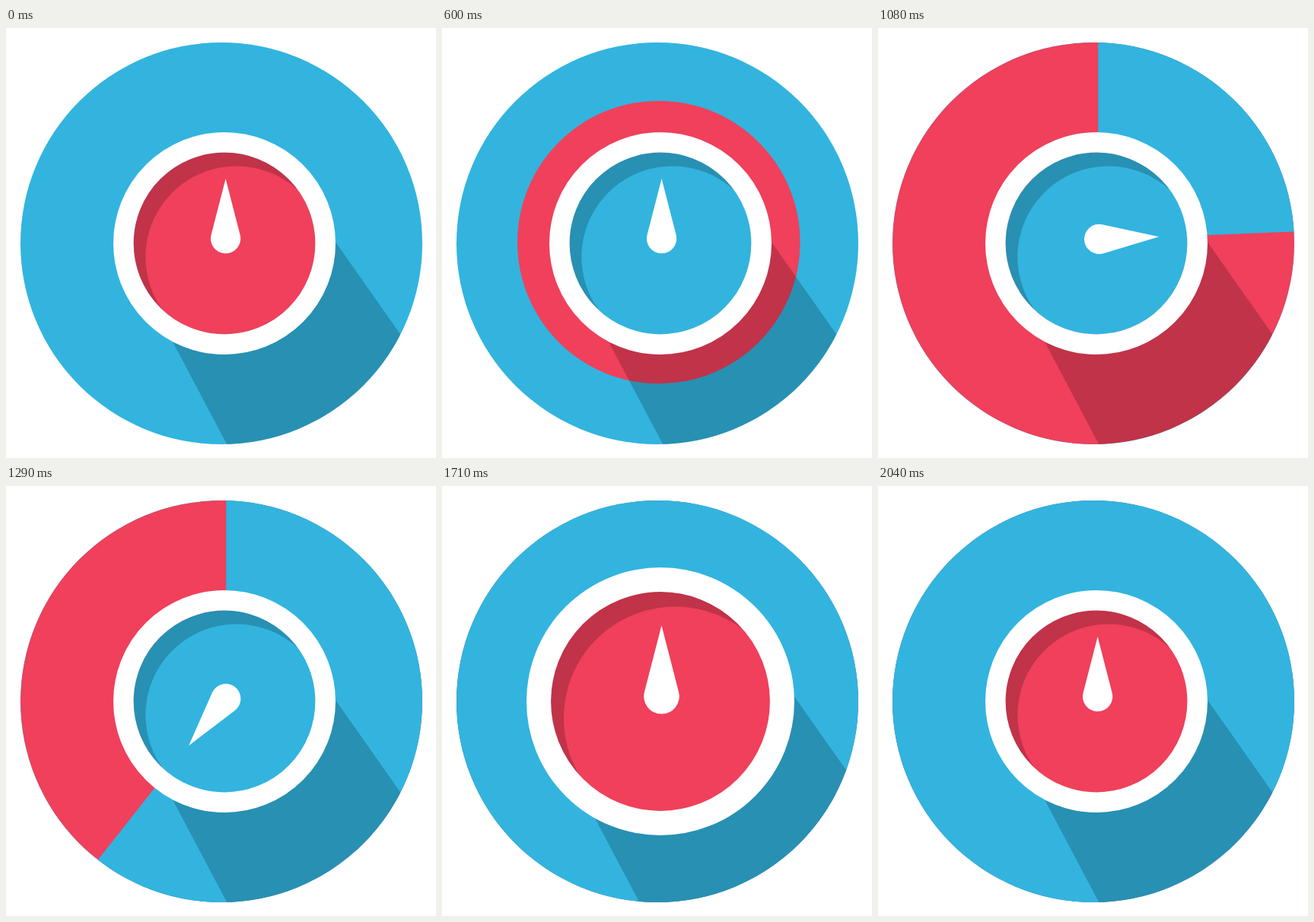
These frames come from a looping animation (565x565 px, 4.04 s). An HTML page:

```html
<!DOCTYPE html>
<html lang="en">
<head>
<meta charset="utf-8">
<title>Dial</title>
<style>
  html, body { margin: 0; width: 100%; height: 100%; overflow: hidden; background: #fff; }
  svg { display: block; width: 100%; height: 100%; }
</style>
</head>
<body>
<svg viewBox="0 0 565 565">
  <defs>
    <clipPath id="face"><circle cx="283" cy="283" r="264"/></clipPath>
  </defs>
  <circle cx="283" cy="283" r="264" fill="#32b4df"/>
  <g clip-path="url(#face)">
    <circle id="flood" fill="#f0405b"/>
    <path id="sweep" fill="#32b4df"/>
    <path id="shadow" opacity=".2"
      d="M129 -26L486 482L219 672L-83 101A131 131 0 0 0 129 -26Z"/>
  </g>
  <circle id="base" cx="287" cy="283" r="119.6"/>
  <circle id="fill"/>
  <path id="crescent" opacity=".2"
    d="M96.75 -70.05A119.5 119.5 0 1 0 -81.25 87.55A119.5 119.5 0 0 1 96.75 -70.05Z"/>
  <circle id="ring" r="132.7" fill="none" stroke="#fff" stroke-width="26.6"/>
  <path id="needle" fill="#fff" d="M-.6 -80L18.4 -6.2A19.6 19.6 0 1 1 -19.6 -6.2Z"/>
</svg>
<script>
const LOOP = 4040, STEP = 30;
const BLUE = '#32b4df', RED = '#f0405b';
const PIVOT = { x: 289.2, y: 278 };
const HUB = { x: 287, y: 283 };
const FACE = { x: 283, y: 283, r: 264 };

const el = id => document.getElementById(id);
const set = (id, attrs) => {
  for (const name in attrs) el(id).setAttribute(name, attrs[name]);
};
const mix = (a, b, k) => a + (b - a) * k;

// Smooth 0..1 progress from start over span
function ease(t, start, span) {
  const u = Math.min(1, Math.max(0, (t - start) / span));
  return u * u * (3 - 2 * u);
}

// Swell to 1.2265 and settle back to 1
const swell = (t, start) =>
  1 + 0.2265 * (ease(t, start, 370) - ease(t, start + 370, 230));

const place = (id, p, scale, turn = 0) =>
  set(id, { transform: `translate(${p.x} ${p.y}) rotate(${turn}) scale(${scale})` });

function sector(deg) {
  if (deg <= 0) return '';
  const r = 600, a = Math.min(deg, 359.99) * Math.PI / 180;
  const x = PIVOT.x + r * Math.sin(a), y = PIVOT.y - r * Math.cos(a);
  return `M${PIVOT.x} ${PIVOT.y}v${-r}A${r} ${r} 0 ${deg > 180 ? 1 : 0} 1 ${x} ${y}Z`;
}

function draw(t) {
  const flood = ease(t, 130, 735);
  const turn = 360 * ease(t, 810, 840);
  const shade = swell(t, 1350);
  const ring = swell(t, 1410);

  set('flood', {
    cx: mix(PIVOT.x, FACE.x, flood),
    cy: mix(PIVOT.y, FACE.y, flood),
    r: FACE.r * flood
  });
  set('sweep', { d: sector(turn) });

  // The dial fills with blue early on and with red at the end
  const late = t >= 1000;
  const grow = late ? ease(t, 1293, 370) : ease(t, 70, 430);
  set('base', { fill: late ? BLUE : RED });
  set('fill', {
    fill: late ? RED : BLUE,
    cx: mix(286, HUB.x, grow),
    cy: mix(277.4, HUB.y, grow),
    r: late ? Math.min(150 * grow, 130 * ring) : 120 * grow
  });

  place('shadow', HUB, shade);
  place('crescent', HUB, shade);
  place('ring', HUB, ring);
  place('needle', PIVOT, swell(t, 1440), turn);
}

let begin;
function tick(now) {
  begin ??= now;
  const t = (now - begin) % LOOP;
  draw(Math.floor(t / STEP) * STEP);
  requestAnimationFrame(tick);
}
draw(0);
requestAnimationFrame(tick);
</script>
</body>
</html>
```
